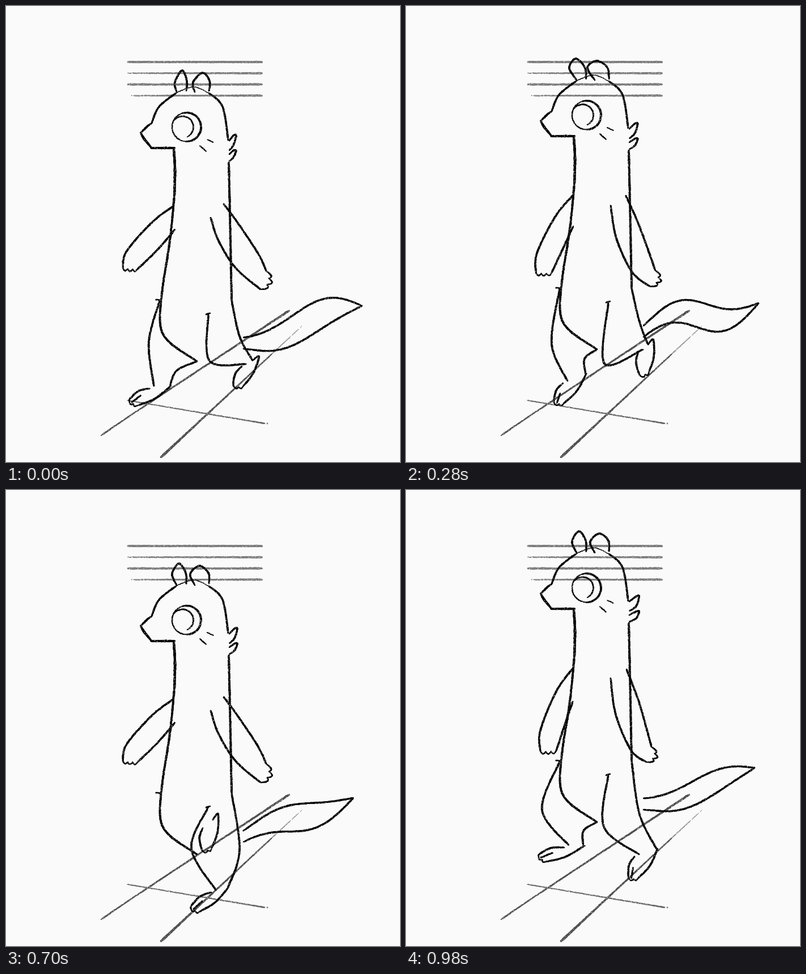
Write an HTML page with a canvas that moves like this. It is 695 by 806 pixels and loops after 1.12 s.

```html
<!DOCTYPE html>
<html lang="en">
<head>
<meta charset="utf-8">
<title>Walk cycle sketch</title>
<style>
html, body { margin: 0; width: 100%; height: 100%; overflow: hidden; background: #fafafa; }
canvas { display: block; }
</style>
</head>
<body>
<canvas id="stage" width="695" height="806"></canvas>
<script>
const PAPER = '#fafafa', INK = '#0b0b0b', GREY = '#7d7d7d', DARK = '#525252';
const STEP = 140, COUNT = 8;
const ctx = document.getElementById('stage').getContext('2d');

let seed = 1;
function rnd() {
  seed = (seed * 1664525 + 1013904223) >>> 0;
  return seed / 4294967296;
}

const mix = (a, b, t) => a.map((v, i) => v + (b[i] - v) * t);
const add = (a, b, k = 1) => a.map((v, i) => v + b[i] * k);
const last = p => p.slice(-2);

function dot(x, y, r, color) {
  ctx.fillStyle = color;
  ctx.beginPath();
  ctx.arc(x, y, r, 0, 7);
  ctx.fill();
}

// Smooth curve through flat [x, y, ...] points
function sample(p) {
  const n = p.length / 2, out = [];
  const get = i => p.slice(2 * Math.max(0, Math.min(n - 1, i))).slice(0, 2);
  for (let i = 0; i < n - 1; i++) {
    const [a, b, c, d] = [get(i - 1), get(i), get(i + 1), get(i + 2)];
    const steps = Math.max(2, Math.ceil(Math.hypot(c[0] - b[0], c[1] - b[1]) / 0.9));
    for (let s = 0; s < steps; s++) {
      const t = s / steps;
      out.push([0, 1].map(k => b[k] + 0.5 * t * (c[k] - a[k] +
        t * (2 * a[k] - 5 * b[k] + 4 * c[k] - d[k] + t * (3 * (b[k] - c[k]) + d[k] - a[k])))));
    }
  }
  return out;
}

// Grainy pencil stroke; fade is the share of the start that is sketchy
function pen(w, p, color = INK, fade = 0, w2 = w) {
  const pts = sample(p), n = pts.length;
  pts.forEach(([x, y], i) => {
    const t = i / n;
    const end = 0.72 + 0.28 * Math.min(1, i / 12, (n - i) / 12);
    const r = (w + (w2 - w) * t) / 2 * end * (0.85 + 0.3 * rnd());
    const jx = (rnd() - 0.5) * 0.7, jy = (rnd() - 0.5) * 0.7, skip = rnd();
    if (t < fade && skip > 0.12 + 0.75 * t / fade) return;
    dot(x + jx, y + jy, r, color);
  });
  for (const [x, y] of pts) {
    const hit = rnd(), a = rnd() - 0.5, b = rnd() - 0.5;
    if (hit < 0.13) dot(x + a * w, y + b * w, 0.55, PAPER);
  }
}

const ink = (...lines) => lines.forEach(p => pen(3.4, p));

function trace(w, count, point) {
  const p = [];
  for (let i = 0; i <= count; i++) p.push(...point(i / count));
  pen(w, p);
}

function arc(w, cx, cy, r, from, to) {
  trace(w, 16, t => {
    const a = from + (to - from) * t;
    return [cx + r * Math.cos(a), cy + r * Math.sin(a)];
  });
}

// Row of small bumps between two points
function toes([x0, y0], [x1, y1], n, sag, bump) {
  const dx = x1 - x0, dy = y1 - y0, len = Math.hypot(dx, dy);
  for (let i = 0; i < n; i++) {
    trace(3, 4, s => {
      const t = (i + s) / n;
      const o = sag * Math.sin(Math.PI * t) + bump * Math.sin(Math.PI * s);
      return [x0 + dx * t - dy / len * o, y0 + dy * t + dx / len * o];
    });
  }
}

function guides() {
  for (let i = 0; i < 4; i++) {
    const y = 99 + 19.8 * i, odd = i % 2;
    pen(odd ? 2.2 : 3.6, [215 - 2 * odd, y, 452, y], GREY, odd * 0.25, 3.8);
  }
  pen(2.4, [168, 759, 240, 710, 500, 538], DARK, 0, 3.6);
  pen(1.4, [526, 562, 470, 614], '#8a8a8a', 0.5, 2);
  pen(2, [470, 614, 273, 798], DARK, 0, 4.2);
  pen(1.8, [214, 697, 457, 738], '#666', 0, 2.5);
  dot(461, 738, 1.4, GREY);
}

function ear(a, b, top, lean) {
  ink([a, 152, a - 3 - 10 * lean, 135 - 5 * lean, (a + b) / 2 + 1 - 11 * lean, top,
    b + 1 - 4 * lean, 132 - 3 * lean, b, 150]);
}

function body(fur, lean) {
  ink([257, 207, 270, 178, 301, 153], [358, 154, 382, 178, 392, 237]);
  pen(1.8, [301, 153, 331, 143, 358, 154]);
  pen(3.6, [257, 207, 250, 212, 238, 224]);
  pen(4.2, [238, 224, 243, 234, 256, 250]);
  pen(4.2, [256, 251, 298, 251]);
  pen(4.4, [296, 252, 298, 290, 297, 335]);
  pen(3.7, [297, 335, 289, 415, 276, 500, 272, 562, 288, 594, 337, 628]);
  pen(3.7, [393, 276, 395, 370, 398, 520]);
  ink([265, 519, 272, 520], [353, 545, 360, 543]);
  for (const [y, s] of [[238, 1], [262, 0.7]]) {
    const x = 406 + fur;
    ink([394, y, x - 5, y - 9 * s, x, y - 9 * s, x - 5, y + 8 * s, 394, y + 17 * s]);
  }
  pen(2.8, [342, 247, 353, 257]);
  pen(2.4, [355, 236, 366, 241]);
  arc(2.3, 318.5, 214, 25.5, 1.6, 4.4);
  arc(3.4, 318.5, 214, 25.5, 4.4, 7.9);
  arc(2.6, 311.5, 214, 19, -2.4, 1.15);
  ear(301, 318, 114, lean);
  ear(333, 358, 118, lean);
}

// Arms swing between a wide and a close pose
function arms(swing) {
  const blend = (wide, close) => mix(wide, close, swing);
  const outer = blend([296, 353, 258, 382, 213, 433, 206, 463], [296, 354, 265, 397, 237, 466, 237, 503]);
  const inner = blend([232, 465, 268, 430, 298, 395], [265, 502, 280, 456, 294, 415]);
  const front = blend([361, 374, 375, 415, 405, 463, 449, 501], [361, 374, 370, 438, 397, 501, 424, 522]);
  const back = blend([384, 350, 410, 385, 445, 438, 459, 468], [389, 358, 410, 413, 428, 476, 433, 495]);
  ink(outer, inner, front, back);
  toes(last(outer), inner, 3, 1, 4);
  toes(last(back), last(front), 3, -10, -6);
}

// Leaf around a wavy spine
function tail({ tip, wave, arch, fat }) {
  for (const side of [-1, 1]) {
    trace(3.3, 12, t => {
      const spine = wave * Math.sin(2 * Math.PI * t) + arch * Math.sin(Math.PI * t);
      const half = 10 * (1 - t) ** 2 + fat * Math.sin(Math.PI * t ** 1.2);
      const [x, y] = mix([419, 596], tip, t);
      return [x, y + spine + side * half];
    });
  }
}

function foot(ankle, toe, heel, start, planted) {
  const mid = mix(ankle, heel, 0.5);
  const len = Math.hypot(toe[0] - mid[0], toe[1] - mid[1]);
  const dir = [(toe[0] - mid[0]) / len, (toe[1] - mid[1]) / len];
  const side = [dir[1], -dir[0]];
  const top = add(ankle, [-8, 4]);
  const end = add(add(toe, side, 16), dir, -8);
  const tip = add(add(toe, side, 4), dir, 3);
  ink([...top, ...add(mix(top, toe, 0.5), side, -5), ...toe, ...tip],
    [...start, ...heel, ...add(mix(heel, end, 0.5), side, 5), ...end]);
  toes(tip, end, 2, 1, 3);
  if (planted) ink([...add(mix(top, toe, 0.5), side, 4), ...add(toe, side, 7)]);
}

// Key points of the near leg over one stride; gap leads to the far leg
const key = (knee, ankle, toe, heel, gap) => ({ knee, ankle, toe, heel, gap });
const stride = [
  key([338, 617], [360, 692], [318, 714], [388, 693], [99, 20]),
  key([327, 633], [370, 707], [327, 735], [391, 704], [100, 20]),
  key([343, 620], [403, 656], [379, 690], [435, 645], [118, -7]),
  key([349, 595], [411, 644], [392, 682], [443, 636], [100, 20]),
  key([359, 627], [424, 633], [401, 668], [446, 620], [84, 14]),
  key([360, 672], [433, 607], [423, 649], [452, 587], [78, 14]),
  key([350, 632], [418, 607], [411, 650], [436, 590], [66, 14]),
  key([326, 588], [382, 685], [331, 700], [408, 687], [95, 57])
];
const HIP_GAP = [86, 23];

function leg(phase, dy, far) {
  const k = stride[phase % COUNT], lifted = phase % COUNT > 3 && phase % COUNT < 7;
  const place = (p, gap) => far ? add(p, gap, -1) : p;
  const [ankle, toe, heel] = [k.ankle, k.toe, k.heel].map(p => place(p, k.gap));
  const hip = place([357, 544 + dy], HIP_GAP), knee = place(k.knee, HIP_GAP);
  const join = lifted ? mix(ankle, heel, 0.5) : heel;
  const seat = far ? [337, 628 + dy] : [398, 520 + dy];
  const calf = far ? add(mix(seat, join, 0.5), [-12, -6]) : [412, mix(seat, join, 0.6)[1]];
  if (!far || !lifted) ink([...hip, ...knee, ...ankle], [...seat, ...calf, ...join]);
  foot(ankle, toe, heel, join, !lifted);
}

const lift = [0, 16, -21, -41];
const lean = [0, 0.5, 1, 0.5, 0.5, 0.5, 1, 0.5];
const swing = [0, 0.38, 0.75, 1, 0, 0, 0.75, 1];
const tails = [
  { tip: [628, 530], wave: 9.5, arch: 0, fat: 26 },
  { tip: [613, 528], wave: -8, arch: 1, fat: 22 },
  { tip: [622, 546], wave: -18, arch: -3, fat: 21 },
  { tip: [615, 532], wave: 6, arch: 8, fat: 20 }
];

function draw(i) {
  const dy = lift[i % 4];
  seed = 77;
  ctx.fillStyle = PAPER;
  ctx.fillRect(0, 0, 695, 806);
  guides();
  ctx.save();
  ctx.translate(0, dy);
  body(Math.abs(dy) / 8, lean[i]);
  arms(swing[i]);
  tail(tails[i % 4]);
  ctx.restore();
  leg(i, dy, true);
  leg(i + 4, dy, false);
}

let shown = -1;
function tick() {
  const i = Math.floor(performance.now() / STEP) % COUNT;
  if (i !== shown) draw(shown = i);
  requestAnimationFrame(tick);
}
tick();
</script>
</body>
</html>
```
